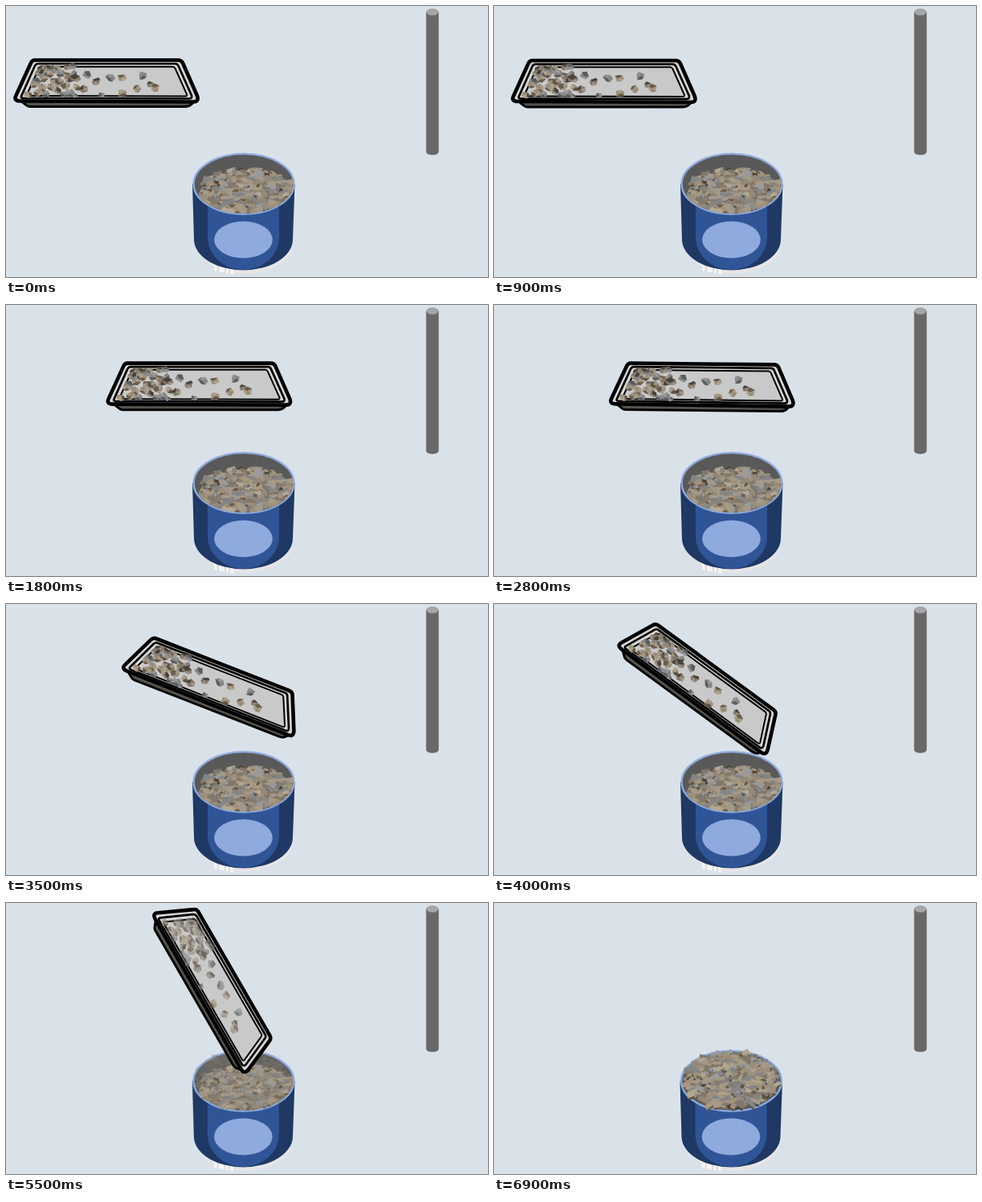
Write an HTML page that moves like this. It is 600 px wide and 338 px high and loops after 7000 ms.

```html
<!DOCTYPE html>
<html lang="en">
<head>
<meta charset="utf-8">
<title>Gravel into the bucket</title>
<style>
  html, body { margin: 0; width: 100%; height: 100%; overflow: hidden; background: #dae2e9; }
  svg { display: block; width: 100vw; height: 100vh; }
</style>
</head>
<body>
<svg viewBox="0 0 600 338">
  <defs>
    <clipPath id="mouth"><ellipse cx="296" cy="222" rx="61.5" ry="37"/></clipPath>
    <g id="pail">
      <path d="M243 312Q262 334 297 334Q340 332 356 306L350 300H243Z" fill="#e6e5e7"/>
      <path d="M259 322V330L283 335V326Z" fill="#f5f5f5"/>
      <path d="M264 325V331M273 327V333M278 328V334" stroke="#d2d2d4" stroke-width="1.5"/>
      <path d="M232 222L234 291A61.500 38.500 0 0 0 357 291L359.500 222Z" fill="#1f3864"/>
      <path d="M251 222H340V289A44.500 40 0 0 1 251 289Z" fill="#2f5597"/>
      <ellipse cx="296" cy="222" rx="62.4" ry="37.600" fill="#595959" stroke="#8faadc" stroke-width="2.4"/>
      <ellipse cx="295.5" cy="291.5" rx="36.3" ry="23" fill="#8faadc"/>
    </g>
  </defs>

  <rect width="600" height="338" fill="#dae2e9"/>

  <path d="M523.200 8V182C523.500 186.700 538 186.700 538.300 182V8Z" fill="#686868" stroke="#606060" stroke-width=".5"/>
  <ellipse cx="530.800" cy="7.800" rx="7.300" ry="4" fill="#a6a6a6" stroke="#7c7c7c" stroke-width=".6"/>

  <g id="low">
    <use href="#pail"/>
    <g clip-path="url(#mouth)">
      <ellipse cx="299" cy="231" rx="57" ry="26" fill="#6c645a"/>
      <g id="lowStones"></g>
    </g>
  </g>

  <g id="full">
    <use href="#pail" x="-0.5"/>
    <ellipse cx="295.500" cy="221" rx="59" ry="34" fill="#6c645a"/>
    <g id="fullStones"></g>
  </g>

  <g id="tray" stroke="#000" stroke-linejoin="round">
    <path d="M17 117L25 123.500Q27 125.500 30 125.500H223Q228 125.500 231 122.500L236 117Z" fill="#55544d" stroke-width="3"/>
    <path d="M36 67.500H214Q218.500 67.500 220 71L238 112Q240.500 119.500 233.500 119.500L18 118.500Q9 118.500 12.500 111.500L31 71Q32.500 67.500 36 67.500Z" fill="#d6d6d6" stroke-width="4.600"/>
    <path d="M39.500 72H210.500Q213.500 72 214.500 74.500L231 111.500Q232 115.500 228 115.500L22 115Q17.500 115 19.500 111.500L36 74.500Q37.500 72 39.500 72Z" fill="#d6d6d6" stroke-width="2.700"/>
    <path d="M43.500 75.700H207.500Q209.500 75.700 210.500 77.700L225 110Q226 112.500 223 112.500L28 112Q25 112 26.500 109.500L41 77.700Q42 75.700 43.500 75.700Z" fill="#c9c9c9" stroke-width="2"/>
    <g id="trayStones" stroke="none"></g>
  </g>
</svg>

<script>
const $ = id => document.getElementById(id);

let seed = 71;
function rnd(a = 0, b = 1) {
  seed = (seed * 16807) % 2147483647;
  return a + (b - a) * seed / 2147483647;
}

// Tones: face, shaded side, lit top
const tones = [
  ['#848584', '#595b5c', '#999b9b'],
  ['#9c907b', '#5e5343', '#b3a793'],
  ['#82786b', '#494138', '#a3998b'],
  ['#a79a85', '#6b5e4e', '#948978']
];

const poly = (pts, fill) =>
  `<polygon points="${pts.map(p => p.map(v => v.toFixed(1)).join()).join(' ')}" fill="${fill}"/>`;

// An angular stone made of one outline and two facets
function stone(x, y, r, squash = 0.85) {
  const tone = tones[Math.floor(rnd(0, tones.length))];
  const turn = rnd(0, 6.28);
  const ring = [];
  for (let i = 0; i < 6; i++) {
    const a = turn + i * Math.PI / 3 + rnd(-0.35, 0.35);
    const d = r * rnd(0.75, 1.15);
    ring.push([x + d * Math.cos(a), y + d * squash * Math.sin(a)]);
  }
  const mid = [x + rnd(-0.25, 0.25) * r, y + rnd(-0.2, 0.2) * r];
  return poly(ring, tone[0]) +
    poly([mid, ring[0], ring[1], ring[2]], tone[1]) +
    poly([mid, ring[3], ring[4]], tone[2]);
}

// A flat chip, as seen in the bucket
function chip(x, y) {
  const tone = tones[Math.floor(rnd(0, tones.length))];
  const a = rnd(-0.6, 0.6), w = rnd(4, 8), h = rnd(2.5, 4.5);
  const at = (u, v) => [x + u * w * Math.cos(a) - v * h * Math.sin(a), y + u * w * Math.sin(a) + v * h * Math.cos(a)];
  const j = () => rnd(0.75, 1.15);
  const left = at(-j(), j()), right = at(j(), j());
  return poly([at(-j(), -j()), at(j(), -j()), right, left], tone[rnd() < 0.3 ? 2 : 0]) +
    poly([left, right, [right[0] - 1, right[1] + 2.6], [left[0] + 1.5, left[1] + 2.2]], tone[1]);
}

// Even spread over an ellipse, back to front
function heap(cx, cy, rx, ry, n) {
  const spots = [];
  for (let i = 0; i < n; i++) {
    const d = Math.sqrt((i + 0.5) / n), a = i * 2.39996;
    spots.push([cx + rx * d * Math.cos(a), cy + ry * d * Math.sin(a)]);
  }
  return spots.sort((p, q) => p[1] - q[1])
    .map(p => rnd() < 0.75 ? chip(...p) : stone(...p, rnd(4, 6.5))).join('');
}

function trayLoad() {
  let out = '';
  for (let row = 0; row < 5; row++) {
    for (let col = 0; col < 6; col++) {
      const v = row / 4;
      const left = 42 - 12 * v, right = 82 + 5 * Math.sin(v * 3);
      out += stone(left + (right - left) * col / 5 + rnd(-3, 3), 77 + 31 * v + rnd(-2.5, 2.5), rnd(5, 7));
    }
  }
  const loose = [
    [101, 86, 5.5], [112, 94, 6.2], [130, 89, 6.5], [144, 90, 6], [170, 87, 5.8],
    [97, 103, 6.2], [119, 111, 4.5], [145, 109, 6.2],
    [163, 103, 6.2], [180, 98, 5], [185, 102, 6], [86, 112, 4]
  ];
  return out + loose.map(s => stone(...s)).join('');
}

$('lowStones').innerHTML = heap(299, 231, 58, 27, 180);
$('fullStones').innerHTML = heap(295.5, 220.5, 57, 34, 230);
$('trayStones').innerHTML = trayLoad();

const span = (t, from, to) => Math.min(1, Math.max(0, (t - from) / (to - from)));
const ease = u => u < 0.5 ? 0.5 * (2 * u) ** 2.5 : 1 - 0.5 * (2 - 2 * u) ** 2.5;

function draw(now) {
  // The picture advances ten times a second
  const t = Math.floor((now % 7000) / 100) * 100;
  const slide = ease(span(t, 400, 2400));
  const tilt = 60 * span(t, 2780, 4800);
  const fade = ease(span(t, 4950, 6300));
  $('tray').setAttribute('transform', `translate(${134 * slide} ${6 * slide}) rotate(${tilt} 125 96)`);
  $('tray').style.display = t < 6600 ? '' : 'none';
  $('trayStones').style.opacity = 1 - fade;
  $('full').style.opacity = fade;
  $('low').style.display = t < 6900 ? '' : 'none';
}

const start = performance.now();
function tick() {
  draw(performance.now() - start);
  requestAnimationFrame(tick);
}
draw(0);
requestAnimationFrame(tick);
</script>
</body>
</html>
```
